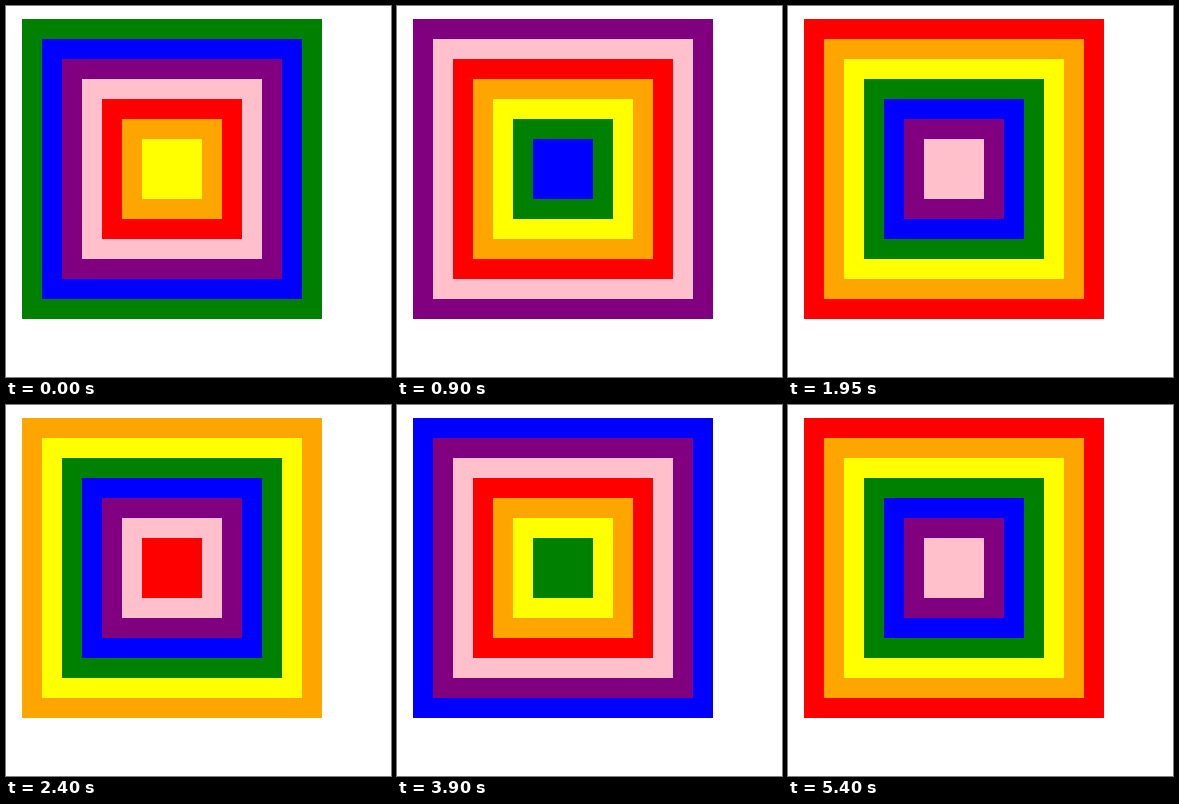
An HTML page with a canvas for the animation above (5.85 s loop, 385x371 px).

```html
<!DOCTYPE html>
<html lang="en">
<head>
<meta charset="utf-8">
<title>Nested squares</title>
<style>
  html, body { margin: 0; width: 100%; height: 100%; overflow: hidden; background: #fff; }
  canvas { display: block; }
</style>
</head>
<body>
<canvas width="385" height="371"></canvas>
<script>
const ctx = document.querySelector('canvas').getContext('2d');
const colors = ['green', 'blue', 'purple', 'pink', 'red', 'orange', 'yellow'];
const LOOP = 5850;
const start = performance.now();

// Steps come in groups of three lasting 450, 450 and 600 ms.
function stepAt(t) {
  return 3 * Math.floor(t / 1500) + Math.min(2, Math.floor(t % 1500 / 450));
}

function draw(now) {
  const step = stepAt(Math.max(0, now - start) % LOOP);
  for (let i = 0; i < colors.length; i++) {
    const inset = 20 * i;
    const size = 300 - 2 * inset;
    ctx.fillStyle = colors[(i + step) % colors.length];
    ctx.fillRect(16 + inset, 13 + inset, size, size);
  }
  requestAnimationFrame(draw);
}
draw(start);
</script>
</body>
</html>
```
